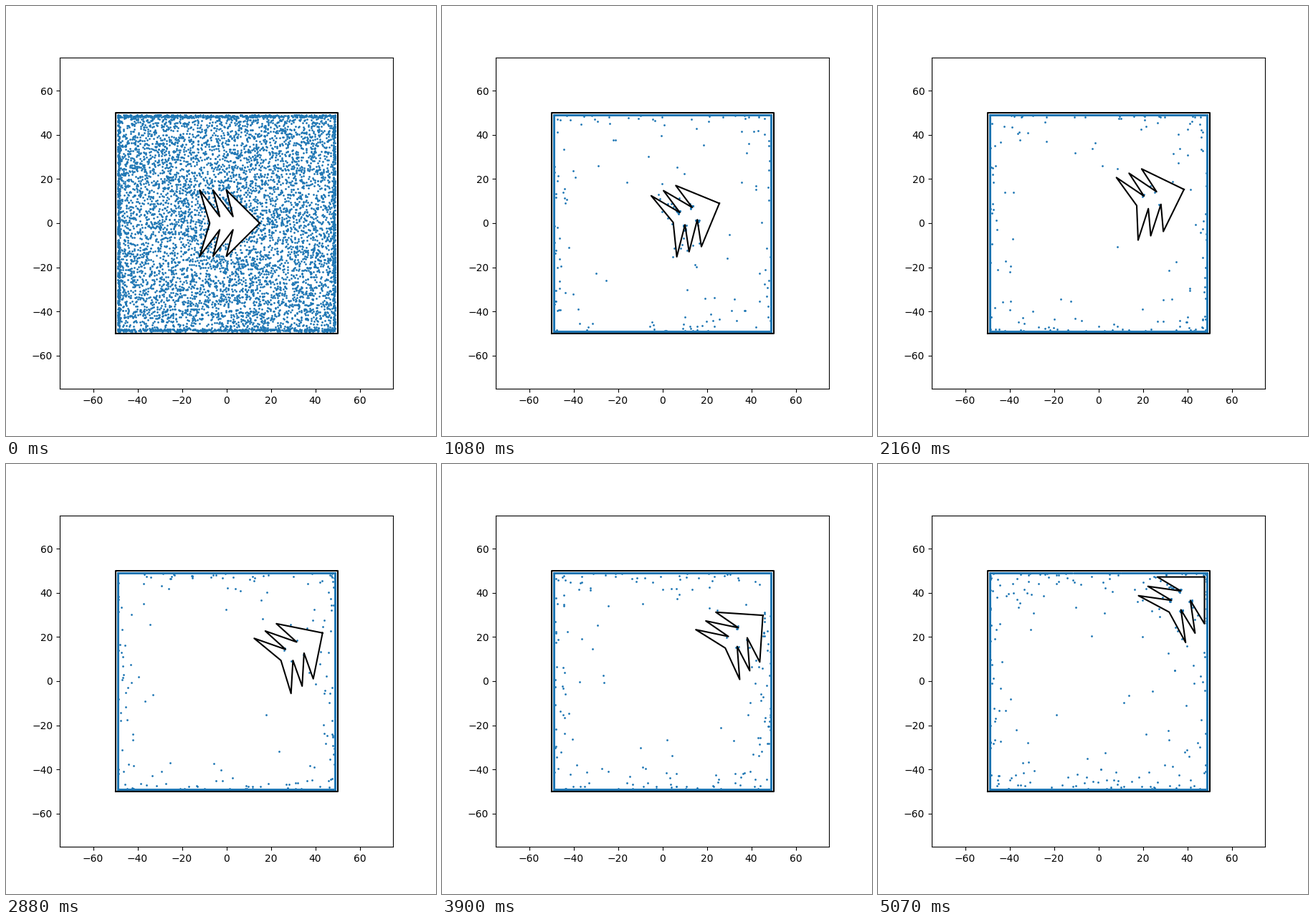
These frames come from a looping animation (600 by 600 pixels, 5.1 s). A matplotlib script:

```python
import numpy as np
import matplotlib.pyplot as plt
from matplotlib.animation import FuncAnimation
from matplotlib.path import Path

FRAMES, INTERVAL = 170, 30
COUNT, SPEED, SUBSTEPS = 8000, 7.0, 7
TURN, STIR = 0.11, 0.5  # heading noise: free, and touching the arrow
BOX, WALL, RADIUS = 50, 49, 0.8

# Upper half of the barbed arrow; the lower half mirrors it.
UPPER = np.array([(15, 0), (0, 15), (3, 3), (-6, 15), (-3, 3), (-12, 15), (-7.5, 0)])
GEAR = np.vstack([UPPER, UPPER[-2::-1] * (1, -1)])
START, EDGE = GEAR[:-1], np.diff(GEAR, axis=0)
OUTLINE = Path(GEAR)

# Key poses of the arrow: time step, x, y, angle in degrees.
POSES = np.array([
    (0, 0, 0, 0),
    (12, 2.9, 0.8, 16),
    (36, 11.8, 3.2, 22.6),
    (72, 24.35, 10.4, 19),
    (96, 30.8, 13.55, 33.6),
    (130, 33.95, 19.95, 41.2),
    (169, 37.15, 36.6, 45),
])


def smooth(t, keys, vals):
    """Monotone cubic through the key values."""
    h = np.diff(keys)
    s = np.diff(vals) / h
    a, b = s[:-1], s[1:]
    same = a * b > 0
    mid = np.where(same, 2 * a * b / np.where(same, a + b, 1), 0)
    m = np.concatenate([s[:1], mid, s[-1:]])
    i = np.clip(np.searchsorted(keys, t, side="right") - 1, 0, len(h) - 1)
    u = (t - keys[i]) / h[i]
    return (vals[i] * (1 + 2 * u) * (1 - u) ** 2
            + vals[i + 1] * u * u * (3 - 2 * u)
            + h[i] * u * (1 - u) * (m[i] * (1 - u) - m[i + 1] * u))


def pose(t):
    x, y, deg = (smooth(t, POSES[:, 0], POSES[:, k]) for k in (1, 2, 3))
    c, s = np.cos(np.radians(deg)), np.sin(np.radians(deg))
    return np.array([x, y]), np.array([[c, -s], [s, c]])


def push_out(pos, center, rot):
    """Slide particles off the arrow; return the indices of those touching."""
    near = np.flatnonzero(((pos - center) ** 2).sum(1) < 22 ** 2)
    if near.size == 0:
        return near
    q = (pos[near] - center) @ rot
    t = ((q[:, None] - START) * EDGE).sum(2) / (EDGE ** 2).sum(1)
    foot = START + np.clip(t, 0, 1)[..., None] * EDGE
    off = q[:, None] - foot
    dist = np.hypot(off[..., 0], off[..., 1])
    row, k = np.arange(len(q)), dist.argmin(1)
    foot, off, dist = foot[row, k], off[row, k], dist[row, k]
    inside = OUTLINE.contains_points(q)
    hit = inside | (dist < RADIUS)
    scale = np.where(inside, -RADIUS, RADIUS) / np.maximum(dist, 1e-6)
    q[hit] = (foot + off * scale[:, None])[hit]
    pos[near] = q @ rot.T + center
    return near[hit]


def advance(pos, step):
    """Move the particles; those pressing on a wall stick where they are."""
    out = np.abs(pos + step) > WALL
    stuck = out.any(1)[:, None] & ~out
    return np.clip(pos + np.where(stuck, 0, step), -WALL, WALL)


def simulate():
    rng = np.random.default_rng(4)
    # Scatter past the walls, so the overflow forms a loose band along them.
    limit = WALL - rng.random((COUNT, 2))
    pos = np.clip(rng.uniform(-55, 55, (COUNT, 2)), -limit, limit)
    pos = pos[~OUTLINE.contains_points(pos)]
    n = len(pos)
    angle = rng.uniform(0, 2 * np.pi, n)
    track = [pos]
    for i in range(FRAMES - 1):
        step = np.column_stack([np.cos(angle), np.sin(angle)]) * SPEED / SUBSTEPS
        noise = np.full(n, TURN)
        for j in range(1, SUBSTEPS + 1):
            pos = advance(pos, step)
            noise[push_out(pos, *pose(i + j / SUBSTEPS))] = STIR
        pos = np.clip(pos, -WALL, WALL)
        track.append(pos)
        angle += rng.normal(0, noise)
    return track


track = simulate()

fig, ax = plt.subplots(figsize=(6, 6), dpi=100)
ax.set_xlim(-75, 75)
ax.set_ylim(-75, 75)
dots, = ax.plot([], [], "o", ms=1, color="tab:blue")
ax.plot([-BOX, BOX, BOX, -BOX, -BOX], [-BOX, -BOX, BOX, BOX, -BOX], "k-")
arrow, = ax.plot([], [], "k-")


def update(i):
    center, rot = pose(i)
    dots.set_data(*track[i].T)
    arrow.set_data(*(GEAR @ rot.T + center).T)
    return dots, arrow


anim = FuncAnimation(fig, update, frames=FRAMES, interval=INTERVAL,
                     repeat=True, repeat_delay=0)
plt.show()
```
